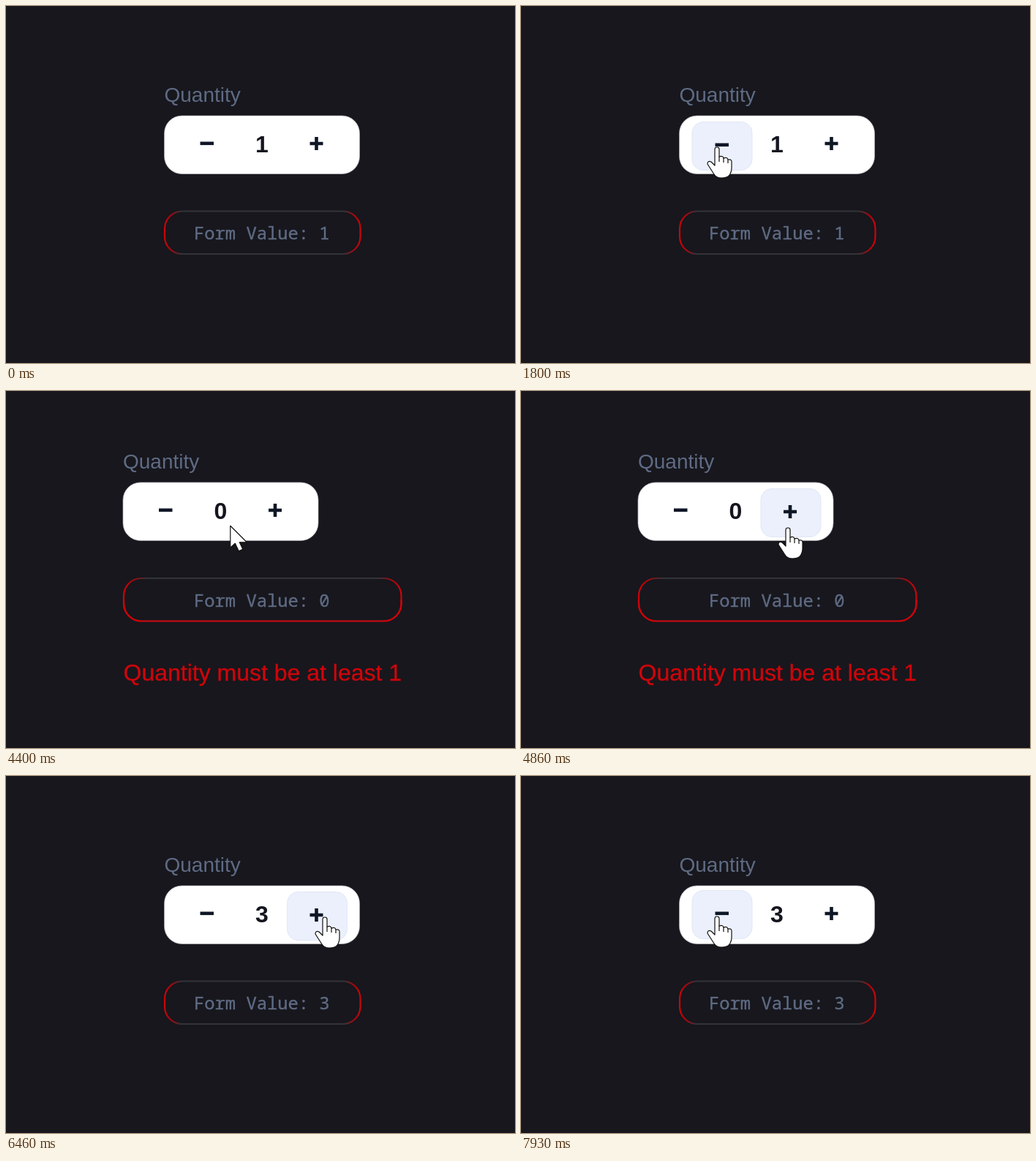
An HTML page for the animation above (8000 ms loop, 696 by 488 pixels).

```html
<!DOCTYPE html>
<html lang="en">
<head>
<meta charset="utf-8">
<title>Quantity stepper</title>
<style>
  html, body { margin: 0; height: 100%; overflow: hidden; background: #17171d; }
  svg { display: block; width: 696px; height: 488px; }
  text { font-family: "Liberation Sans", Arial, sans-serif; }
  .muted { fill: #5f6b84; }
  #value { font: 23.8px "Noto Sans Mono", monospace; stroke: #5f6b84; stroke-width: .4; }
  .box { fill: #fff; stroke: #b4b5ba; stroke-width: .7; }
  .sign { stroke: #0f1626; stroke-width: 4.6; }
  .hover { fill: #ebf0fc; stroke: #e1e7f5; }
  .line { fill: none; stroke-width: 2.2; }
  .alert { fill: #d2060b; stroke: #a8060c; stroke-width: .5; }
  .cursor { fill: #fff; stroke: #111; stroke-width: 1.2; stroke-linejoin: round; }
</style>
</head>
<body>
<svg viewBox="0 0 696 488">
  <defs>
    <linearGradient id="edge" x2=".5" spreadMethod="reflect">
      <stop offset="0" stop-color="#cc0409"/>
      <stop offset=".06" stop-color="#a8060c"/>
      <stop offset=".17" stop-color="#33333a"/>
    </linearGradient>
  </defs>

  <g id="field">
    <text class="muted" x="216.5" y="131.3" font-size="28">Quantity</text>
    <rect class="box" x="216.5" y="150" width="267" height="79.5" rx="24"/>
    <g id="minus">
      <rect class="hover" x="234" y="156.5" width="82" height="66" rx="15"/>
      <path class="sign" d="M265.5 187.8h18.500"/>
    </g>
    <text id="count" x="350" y="199.6" font-size="32" font-weight="bold" text-anchor="middle" fill="#14151f"></text>
    <g id="plus">
      <rect class="hover" x="384.5" y="156.5" width="82" height="66" rx="15"/>
      <path class="sign" d="M415.5 188h18M424.5 179v18"/>
    </g>
  </g>

  <g id="form">
    <rect id="frame" class="line" y="280.5" height="58.5" rx="24" stroke="url(#edge)"/>
    <text id="value" class="muted" x="257" y="319"></text>
  </g>

  <g id="error">
    <path class="line" d="M161 285V290.500a24 24 0 0 0 24 24H516.500a24 24 0 0 0 24-24V285" stroke="#cc0409"/>
    <text class="alert" x="160.500" y="396" font-size="32">Quantity must be at least 1</text>
  </g>

  <path id="arrow" class="cursor" d="M0 0V30L6.500 24L11.500 34.500L17 32L12.500 22.500H22.500Z"/>
  <g id="hand" class="cursor">
    <path d="M-3 3Q-3 0 0 0Q3 0 3 3V13Q8 11 9 15Q14 13 15 17Q20 16 20 20V28Q20 34 17 38Q14 42 6 42Q-1 42-4 37L-13 23Q-13 18-8 20L-3 25Z"/>
    <path d="M3 13v7M9 15v6M15 17v5" fill="none"/>
  </g>
</svg>
<script>
const LOOP = 8000, FADE = 200, ENTER = 860;
const $ = id => document.getElementById(id);

const moves = [
  { at: ENTER, time: 140, to: [173, 275] },
  { at: 1000, time: 400, to: [268, 193] },
  { at: 1870, time: 460, to: [274, 182] },
  { at: 4342, time: 300, to: [365, 187] },
  { at: 5130, time: 200, to: [481, 198] },
  { at: 5330, time: 270, to: [436, 193] },
  { at: 6930, time: 1000, to: [268, 192] }
];
const clicks = [
  { at: 1870, id: "minus" }, { at: 4870, id: "plus" },
  { at: 5900, id: "plus" }, { at: 6400, id: "plus" }
];

const clamp = v => Math.min(1, Math.max(0, v));
const easeOut = u => 1 - (1 - clamp(u)) ** 2;
const place = (el, x, y) => el.setAttribute("transform", `translate(${x} ${y})`);
const show = (el, on) => el.setAttribute("visibility", on ? "visible" : "hidden");

const pointer = t => moves.reduce(([x, y], { at, time, to }) => {
  const k = easeOut((t - at) / time);
  return [x + (to[0] - x) * k, y + (to[1] - y) * k];
}, [38, 349]);

const countAt = t => clicks.filter(c => c.at <= t)
  .reduce((n, c) => n + (c.id === "plus" ? 1 : -1), 1);

// The centred layout moves up and left when the error widens it
const shiftAt = t => countAt(t) < 1 ? [-56.5, -25] : [0, 0];

function isOver(id, t) {
  const { x, y, width, height } = $(id).firstElementChild.getBBox();
  const [px, py] = pointer(t), [dx, dy] = shiftAt(t);
  return Math.abs(px - dx - x - width / 2) < width / 2
      && Math.abs(py - dy - y - height / 2) < height / 2;
}

// Hover fades linearly: the share of the last FADE ms spent over the button
function glow(id, t) {
  const steps = 20;
  let hits = 0;
  for (let i = 0; i < steps; i++) hits += isOver(id, t - i * FADE / steps);
  return hits / steps;
}

function draw(t) {
  const count = countAt(t), invalid = count < 1;
  $("count").textContent = count;
  $("value").textContent = "Form Value: " + count;
  place($("field"), ...shiftAt(t));
  place($("form"), 0, invalid ? -24.5 : 0);
  $("frame").setAttribute("x", invalid ? 161 : 217);
  $("frame").setAttribute("width", invalid ? 379.5 : 267.5);
  show($("error"), invalid);

  for (const id of ["minus", "plus"]) {
    const pressed = clicks.some(c => c.id === id && Math.abs(t - c.at) < 75);
    place($(id), 0, pressed ? 2 : 0);
    $(id).firstElementChild.setAttribute("opacity", glow(id, t));
  }

  const [x, y] = pointer(t);
  const visible = t >= ENTER, over = isOver("minus", t) || isOver("plus", t);
  place($("arrow"), x + .5, y + .5);
  place($("hand"), x, y);
  show($("arrow"), visible && !over);
  show($("hand"), visible && over);
}

const start = performance.now();
function tick() {
  draw((performance.now() - start) % LOOP);
  requestAnimationFrame(tick);
}
tick();
</script>
</body>
</html>
```
